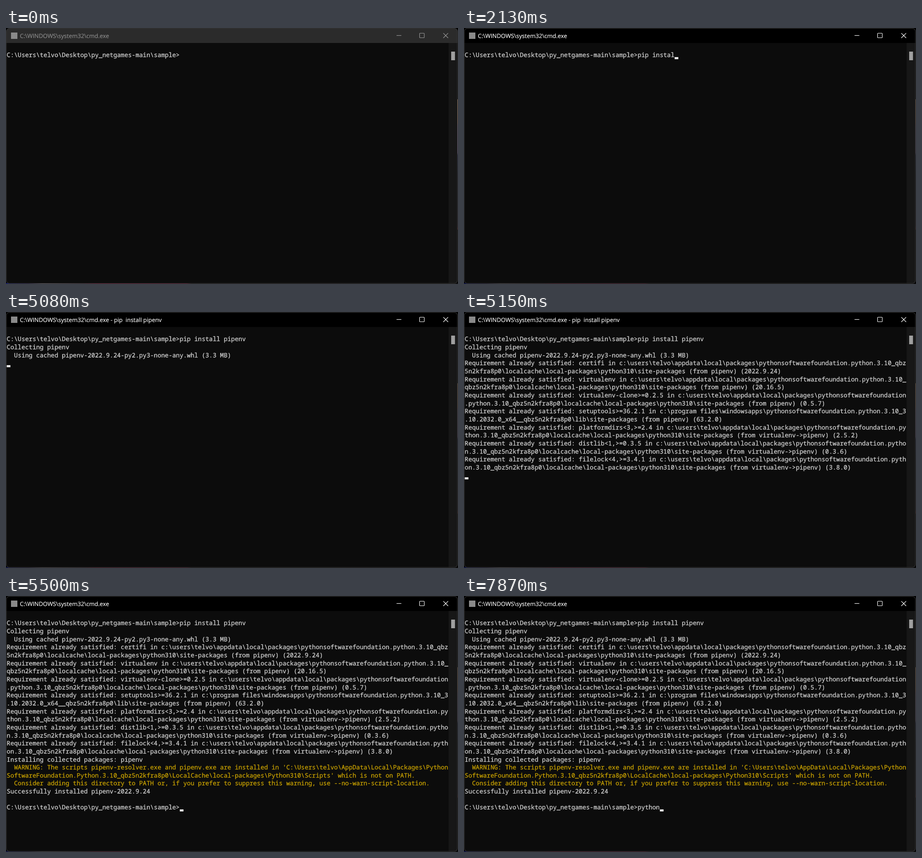
These frames come from a looping animation (993 by 564 pixels, 8000 ms). An HTML page:

```html
<!DOCTYPE html>
<html lang="en">
<head>
<meta charset="utf-8">
<title>Terminal</title>
<style>
  html, body { margin: 0; width: 100%; height: 100%; overflow: hidden; background: #000; }
  svg { display: block; }
  text { white-space: pre; text-rendering: geometricPrecision; }
  #rows { font: 13.483px "Noto Sans Mono", monospace; stroke-width: .3; }
  #rows text { fill: #d2d2d2; stroke: #d2d2d2; }
  #rows .warn { fill: #c9a200; stroke: #c9a200; }
  #title { font: 12.84px "Open Sans", sans-serif; stroke-width: .15; }
</style>
</head>
<body>
<svg width="993" height="564" viewBox="0 0 993 564">
  <defs>
    <linearGradient id="below">
      <stop offset="0" stop-color="#1c2470"/>
      <stop offset=".05" stop-color="#2a2350"/>
      <stop offset=".08" stop-color="#6c6670"/>
      <stop offset=".17" stop-color="#4a3a48"/>
      <stop offset=".2" stop-color="#7c1c40"/>
      <stop offset=".4" stop-color="#6a1a3a"/>
      <stop offset=".41" stop-color="#1c1a1e"/>
      <stop offset="1" stop-color="#141416"/>
    </linearGradient>
    <linearGradient id="beside" x1="0" y1="0" x2="0" y2="1">
      <stop offset="0" stop-color="#d8a880"/>
      <stop offset=".18" stop-color="#c89a80"/>
      <stop offset=".2" stop-color="#a08cac"/>
      <stop offset=".41" stop-color="#8878a8"/>
      <stop offset=".43" stop-color="#26305c"/>
      <stop offset=".6" stop-color="#1c1e2c"/>
      <stop offset=".97" stop-color="#24202a"/>
      <stop offset="1" stop-color="#6a2424"/>
    </linearGradient>
    <clipPath id="frame"><rect x="0.5" y="0.5" width="992" height="562.5" rx="7"/></clipPath>
  </defs>
  <rect width="993" height="564" fill="#000"/>
  <g id="desk">
    <rect y="562" width="993" height="2" fill="url(#below)"/>
    <rect x="991" y="157" width="2" height="287" fill="url(#beside)"/>
  </g>
  <g clip-path="url(#frame)">
    <rect width="992" height="563" fill="#0c0c0c"/>
    <rect id="bar" width="993" height="33"/>
    <rect x="972.5" y="33" width="20" height="531" fill="#171717"/>
    <rect x="978" y="52" width="8.4" height="19" fill="#9f9f9f"/>
  </g>
  <rect x="0.75" y="0.75" width="991" height="562" rx="7" fill="none" stroke="#3a3a3a"/>
  <rect x="11" y="10" width="14" height="14" fill="#8a8a8a"/>
  <text id="title" x="30.6" y="22"></text>
  <g id="buttons" fill="none" stroke-width="1.15">
    <path d="M858 16.5h10.5"/>
    <rect x="908.6" y="11.5" width="10.3" height="10" rx="1"/>
    <path d="M960.7 11.4l10.6 10.6M971.3 11.4l-10.6 10.6"/>
  </g>
  <g id="rows"></g>
  <rect id="cursor" width="8.09" height="4.5" fill="#f2f2f2"/>
</svg>
<script>
const LOOP = 8000, COLS = 120, CELL = 8.09, ROW = 17.65, LEFT = 1.6, FIRST = 46.8;
const $ = id => document.getElementById(id);

const prompt = "C:\\Users\\telvo\\Desktop\\py_netgames-main\\sample>";
const path = "C:\\WINDOWS\\system32\\cmd.exe";
const install = "pip install pipenv";
const vendor = "pythonsoftwarefoundation.python.3.10_";
const local = "c:\\users\\telvo\\appdata\\local\\packages\\" + vendor +
  "qbz5n2kfra8p0\\localcache\\local-packages\\python310\\site-packages";
const apps = "c:\\program files\\windowsapps\\" + vendor +
  "3.10.2032.0_x64__qbz5n2kfra8p0\\lib\\site-packages";

const need = (name, version, by = "pipenv", dir = local) =>
  `Requirement already satisfied: ${name} in ${dir} (from ${by}) (${version})`;
const wrap = line => line.match(new RegExp(`.{1,${COLS}}`, "g")) || [""];

const fetched = [
  "Collecting pipenv",
  "  Using cached pipenv-2022.9.24-py2.py3-none-any.whl (3.3 MB)"
];
const needs = [
  need("certifi", "2022.9.24"),
  need("virtualenv", "20.16.5"),
  need("virtualenv-clone>=0.2.5", "0.5.7"),
  need("setuptools>=36.2.1", "63.2.0", "pipenv", apps),
  need("platformdirs<3,>=2.4", "2.5.2", "virtualenv->pipenv"),
  need("distlib<1,>=0.3.5", "0.3.6", "virtualenv->pipenv"),
  need("filelock<4,>=3.4.1", "3.8.0", "virtualenv->pipenv")
].flatMap(wrap);
const installing = "Installing collected packages: pipenv";
const warning = [
  "  WARNING: The scripts pipenv-resolver.exe and pipenv.exe are installed in " +
  "'C:\\Users\\telvo\\AppData\\Local\\Packages\\PythonSoftwareFoundation.Python.3.10_qbz5n2kfra8p0" +
  "\\LocalCache\\local-packages\\Python310\\Scripts' which is not on PATH.",
  "  Consider adding this directory to PATH or, if you prefer to suppress this warning, " +
  "use --no-warn-script-location."
].flatMap(wrap);
const done = ["Successfully installed pipenv-2022.9.24", ""];

const call = prompt + install;
const listed = [call, ...fetched, ...needs];
const warned = [...listed, installing, ...warning];
const finished = [...warned, ...done];
const warnStart = listed.length + 1, warnEnd = warned.length;

// [time, lines, cursor on]; the cursor sits at the end of the last line
const scenes = [];
const show = (time, lines, on = 1) => scenes.push([time, lines, on]);
// [time, characters typed, cursor on]
const type = (before, word, keys) => keys.forEach(([time, n, on = 1]) =>
  show(time, [...before, prompt + word.slice(0, n)], on));

type([], install, [
  [0, 0, 0], [330, 0], [730, 1], [800, 1, 0], [930, 2], [1130, 3],
  [1330, 3, 0], [1430, 4], [1530, 5], [1630, 6], [1720, 7], [1930, 8], [1980, 9],
  [2130, 10], [2330, 11], [2390, 11, 0], [2670, 12], [2940, 13], [3010, 13, 0],
  [3150, 14], [3300, 15], [3380, 16], [3460, 16, 0], [3550, 17], [3760, 18]
]);
show(4030, [call, ""], 0);
show(4550, [call, ""]);
show(5080, [call, ...fetched, ""]);
show(5150, [...listed, ""]);
show(5220, [...listed, installing]);
show(5290, [...listed, installing], 0);
show(5360, [...warned, ""]);
show(5430, [...finished.slice(0, -1), ""]);
type(finished, "python", [
  [5500, 0], [6050, 0, 0], [6180, 1], [6580, 2, 0], [7110, 2], [7180, 3],
  [7450, 4], [7650, 4, 0], [7720, 5], [7870, 6]
]);

const rows = Array.from({ length: finished.length + 1 }, (_, i) => {
  const row = document.createElementNS("http://www.w3.org/2000/svg", "text");
  row.setAttribute("x", LEFT);
  row.setAttribute("y", FIRST + (i + 1) * ROW);
  if (i >= warnStart && i < warnEnd) row.setAttribute("class", "warn");
  return $("rows").appendChild(row);
});

function put(node, text) {
  if (node.textContent !== text) node.textContent = text;
}

function draw(time) {
  const [, lines, on] = scenes.findLast(scene => scene[0] <= time);
  rows.forEach((row, i) => put(row, lines[i] || ""));

  const last = lines.length - 1;
  $("cursor").setAttribute("x", LEFT + lines[last].length * CELL);
  $("cursor").setAttribute("y", FIRST + (last + 1) * ROW - 0.3);
  $("cursor").setAttribute("opacity", on);

  const active = time >= 330, running = time >= 4030 && time < 5500;
  const ink = active ? "#fff" : "#8e8e8e";
  put($("title"), path + (running ? " - pip  install pipenv" : ""));
  $("title").setAttribute("fill", ink);
  $("title").setAttribute("stroke", ink);
  $("buttons").setAttribute("stroke", active ? "#fff" : "#999");
  $("bar").setAttribute("fill", active ? "#000" : "#2b2b2b");
  $("desk").setAttribute("opacity", active ? 0.6 : 1);
}

const start = performance.now();
function tick() {
  draw((performance.now() - start) % LOOP);
  requestAnimationFrame(tick);
}
tick();
</script>
</body>
</html>
```
